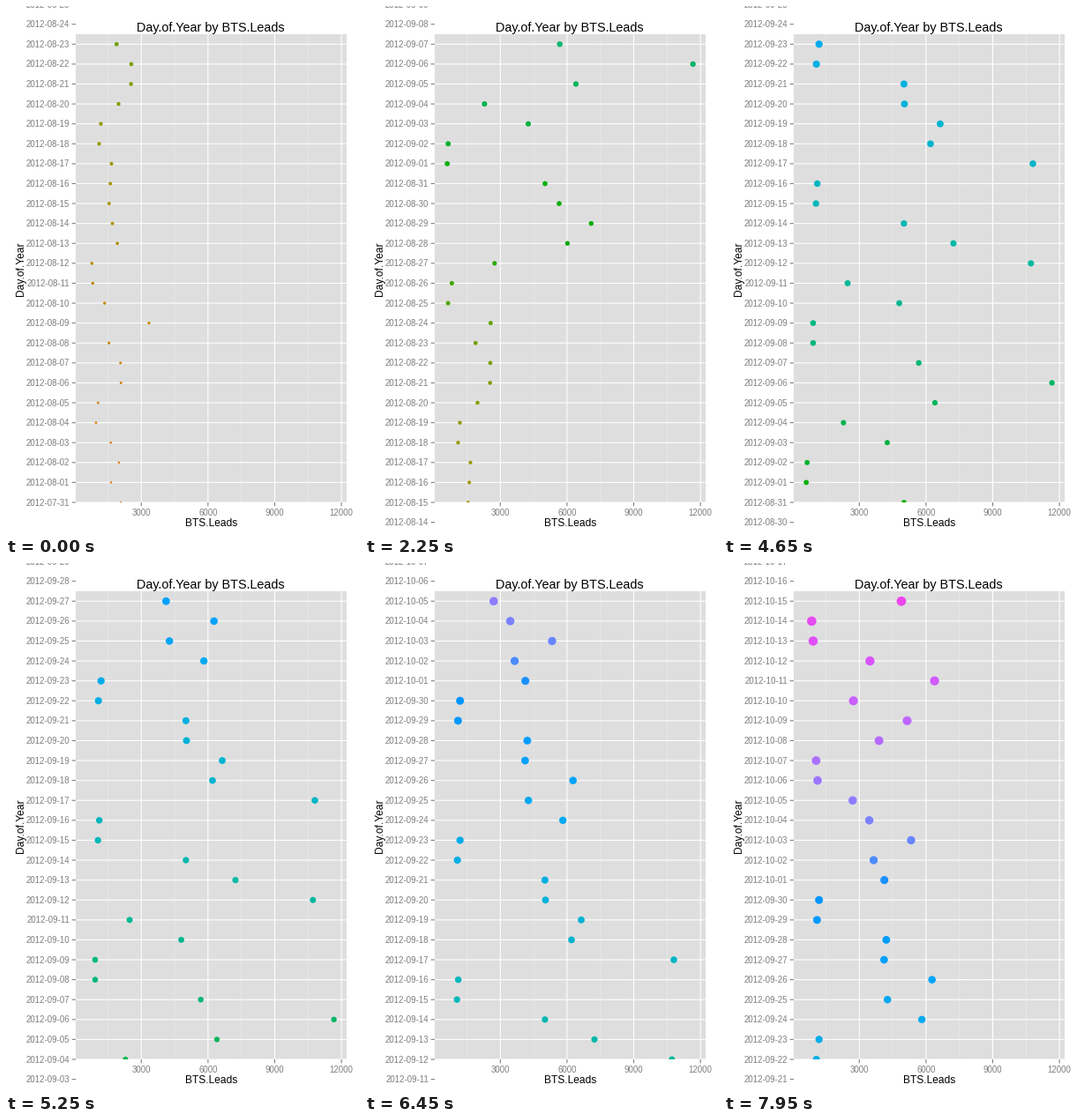
Animation of 400 by 600 pixels, one loop 8 s. Source, as a matplotlib script:

```python
import matplotlib.pyplot as plt
import numpy as np
from matplotlib.animation import FuncAnimation
from matplotlib.patches import Rectangle

WIDTH, HEIGHT, DPI = 400, 600, 100
PX = 72 / DPI                              # points per pixel
LEFT, RIGHT, TOP, BOTTOM = 79, 385.7, 32, 563
ROW = (BOTTOM - TOP) / 23.5                # height of one day
TICK_MS, TICKS_PER_DAY, DAYS_SHOWN = 50, 3, 54
GREY = "#7f7f7f"

plt.rcParams["font.family"] = "Liberation Sans"

dates = [str(d) for d in np.datetime64("2012-07-31") + np.arange(79)]

# horizontal dot position of each day, in pixels
dot_x = np.array([
    130, 119, 128, 118.7, 102, 104.4, 130.3, 129.7, 116.7, 162,
    111.7, 98.3, 97.3, 126.2, 120.6, 116.8, 118.2, 119.5, 105.5, 107.5,
    127.5, 141.7, 142, 125.3, 142.4, 94.1, 98.4, 146.8, 229.4, 256.3,
    220, 204, 93.2, 94.2, 185, 135.4, 239, 371.6, 220.7, 101,
    101, 198.6, 140.1, 347.8, 260, 203.9, 104.2, 105.7, 350, 234,
    245, 204.5, 203.9, 104.7, 107.7, 224.2, 185.2, 235.7, 181.4, 183.9,
    105.4, 107.7, 181.7, 169.6, 212, 164.6, 145.8, 106, 104.4, 175.7,
    207.5, 146.6, 238.6, 165.4, 101, 99.4, 201])
days = np.arange(len(dot_x))


def hcl_to_rgb(hue, chroma=115, light=60):
    """Polar CIE-LUV to sRGB, clipped to the gamut."""
    angle = np.radians(hue)
    u = chroma * np.cos(angle) / (13 * light) + 0.19784
    v = chroma * np.sin(angle) / (13 * light) + 0.46834
    y = np.full_like(u, ((light + 16) / 116) ** 3)
    xyz = np.stack([9 * y * u / (4 * v), y, y * (12 - 3 * u - 20 * v) / (4 * v)])
    matrix = np.array([[3.2406, -1.5372, -0.4986],
                       [-0.9689, 1.8758, 0.0415],
                       [0.0557, -0.2040, 1.0570]])
    rgb = np.clip(matrix @ xyz, 0, 1).T
    return np.where(rgb <= 0.0031308, 12.92 * rgb, 1.055 * rgb ** (1 / 2.4) - 0.055)


colors = hcl_to_rgb(np.interp(days, [0, 23, 48, 76], [30, 103, 200, 307]))
diameters = 2.2 + 0.112 * days

fig = plt.figure(figsize=(WIDTH / DPI, HEIGHT / DPI), dpi=DPI, facecolor="white")
ax = fig.add_axes([0, 0, 1, 1])
ax.set(xlim=(0, WIDTH), ylim=(HEIGHT, 0))
ax.axis("off")

panel = Rectangle((LEFT, TOP), RIGHT - LEFT, BOTTOM - TOP, fc="#dedede", lw=0)
ax.add_patch(panel)


def line(xs, ys, color, width=1.07, in_panel=False):
    artist, = ax.plot(xs, ys, color=color, lw=width * PX, snap=False,
                      solid_capstyle="butt", zorder=2)
    if in_panel:
        artist.set_clip_path(panel)
    return artist


def label(x, y, text, size, color="black", **kwargs):
    return ax.text(x, y, text, fontsize=size * PX, color=color,
                   va="baseline", zorder=5, **kwargs)


def value_x(value):
    return 77.7 + value * 0.0252


def row_y(row):
    return BOTTOM - row * ROW


for value in range(1500, 12000, 3000):
    line([value_x(value)] * 2, [TOP, BOTTOM], "#ebebeb", 0.54, True)
for row in range(24):
    line([LEFT, RIGHT], [row_y(row)] * 2, "white", in_panel=True)
for value in range(3000, 12001, 3000):
    x = value_x(value)
    line([x, x], [TOP, BOTTOM], "white", in_panel=True)
    line([x, x], [BOTTOM, BOTTOM + 4.3], GREY)
    label(x, 578.5, str(value), 9.6, GREY, ha="center")

rows = range(-1, 26)
ticks = [line([LEFT - 4.3, LEFT], [row_y(r)] * 2, GREY) for r in rows]
names = [label(72, row_y(r) + 3.6, "", 9.6, GREY, ha="right") for r in rows]

label(232.3, 29, "Day.of.Year by BTS.Leads", 14.4, ha="center")
label(232.3, 590, "BTS.Leads", 12, ha="center")
ax.text(19.7, 298, "Day.of.Year", fontsize=12 * PX, rotation=90,
        ha="right", va="center", zorder=5).set(
            ha="center", va="baseline", rotation_mode="anchor")

dots = ax.scatter(dot_x, row_y(days), s=(diameters * PX) ** 2,
                  c=colors, linewidths=0, zorder=3)
dots.set_clip_path(panel)


def update(frame):
    first = frame // TICKS_PER_DAY
    dots.set_offsets(np.column_stack([dot_x, row_y(days - first)]))
    for row, tick, name in zip(rows, ticks, names):
        day = first + row
        tick.set_visible(day >= 0)
        name.set_text(dates[day] if day >= 0 else "")
    return [dots, *ticks, *names]


# the last day is held for a single tick
frame_count = (DAYS_SHOWN - 1) * TICKS_PER_DAY + 1
anim = FuncAnimation(fig, update, frames=frame_count, interval=TICK_MS,
                     repeat=True, repeat_delay=0)
plt.show()
```
